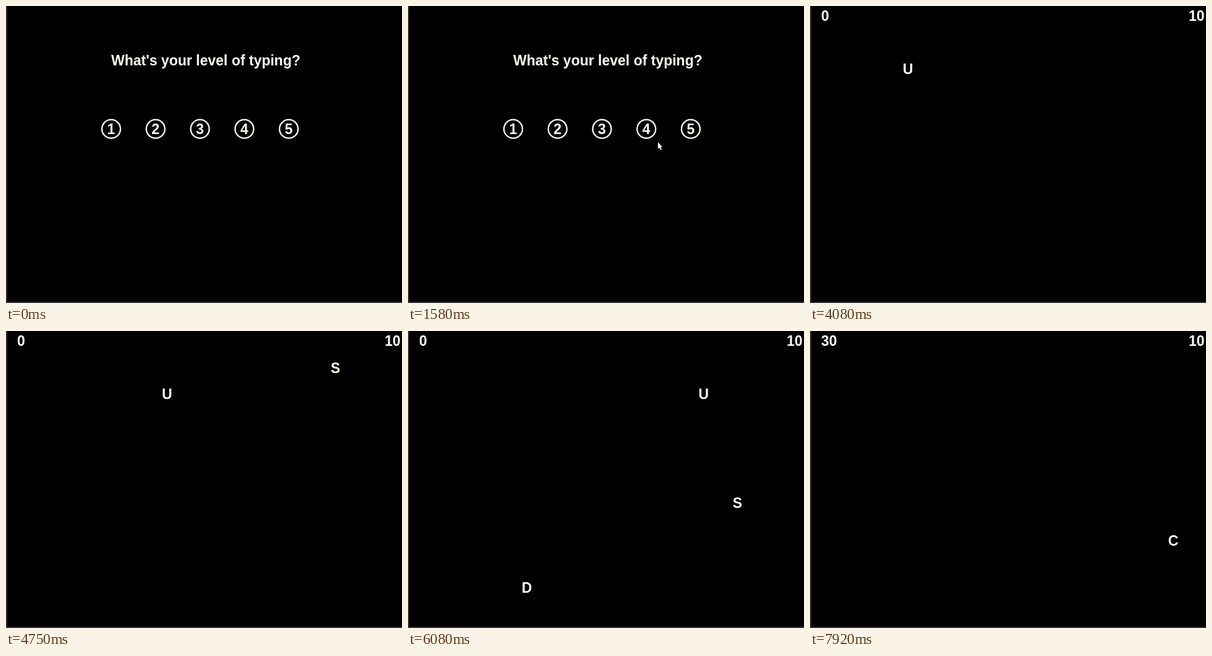
Animation of 640x480 px, one loop 8 s. Source, as an HTML page with a canvas:

```html
<!DOCTYPE html>
<html lang="en">
<head>
<meta charset="utf-8">
<title>Typing game</title>
<style>
  html, body { margin: 0; width: 100%; height: 100%; overflow: hidden; background: #000; }
  canvas { display: block; width: 640px; height: 480px; }
</style>
</head>
<body>
<canvas id="stage" width="640" height="480"></canvas>
<script>
const ctx = document.getElementById('stage').getContext('2d');
const LOOP = 8000, FPS = 12, STEP = 6.8;
const INK = '#fffff0', EDGE = '#32322e';
const GAME_START = 26;

// Game ticks elapsed at each step of the clock: [step, ticks]
const TICKS = [[38, 0], [47, 17], [49, 21], [57, 36], [64, 51], [67, 56], [73, 68], [77, 71.4], [80, 77]];
// Pointer: [step, x, y]
const POINTER = [[11, 606, 480], [15, 476, 300], [19, 404, 220], [24, 389, 205]];

function along(keys, at, column = 1) {
  if (at <= keys[0][0]) return keys[0][column];
  for (let i = 1; i < keys.length; i++) {
    const a = keys[i - 1], b = keys[i];
    if (at <= b[0]) return a[column] + (b[column] - a[column]) * (at - a[0]) / (b[0] - a[0]);
  }
  return keys[keys.length - 1][column];
}

function write(text, x, y, align = 'center') {
  ctx.font = 'bold 23px "Liberation Sans", Arial, sans-serif';
  ctx.textAlign = align;
  ctx.fillText(text, x, y);
}

function drawEdges() {
  ctx.fillStyle = EDGE;
  ctx.fillRect(0, 0, 2, 480);
  ctx.fillRect(0, 478, 640, 2);
}

function drawPointer(x, y) {
  const outline = [[0, 0], [0, 11], [2.5, 9], [4.5, 13], [6, 12], [4.5, 8], [7, 8]];
  ctx.beginPath();
  for (const [dx, dy] of outline) ctx.lineTo(x + dx, y + dy);
  ctx.fill();
}

function drawMenu(step) {
  write("What's your level of typing?", 170, 96, 'left');
  ctx.lineWidth = 2.3;
  for (let level = 1; level <= 5; level++) {
    const x = 170 + (level - 1) * 71.75;
    ctx.beginPath();
    ctx.arc(x, 198.7, 15, 0, Math.PI * 2);
    ctx.stroke();
    write(level, x, 207);
  }
  if (step >= POINTER[0][0]) drawPointer(along(POINTER, step, 1), along(POINTER, step, 2));
}

function drawGame(step) {
  const hits = [75, 77, 80];
  const score = hits.filter(hit => step >= hit).length * 10;
  write(score, 18, 24, 'left');
  write('10', 612, 24, 'left');

  const tick = Math.round(along(TICKS, step));
  if (step >= 38 && step < hits[0]) write('U', 15.5 + tick * STEP, 110);
  if (tick >= 29 && step < hits[1]) write('S', 532.5, 170 + (tick - 51) * STEP);
  if (tick >= 63 && step < hits[2]) write('D', 192, 422.5 - (tick - 68) * STEP);
  if (step >= 94) write('C', 596 - (step - 94) * 9, 347);
}

function render(now) {
  const step = Math.floor(((now % LOOP) + 4) * FPS / 1000) % (LOOP * FPS / 1000);
  ctx.fillStyle = '#000';
  ctx.fillRect(0, 0, 640, 480);
  drawEdges();
  ctx.fillStyle = ctx.strokeStyle = INK;
  if (step < GAME_START) drawMenu(step);
  else drawGame(step);
}

const start = performance.now();
function loop() {
  render(performance.now() - start);
  requestAnimationFrame(loop);
}
loop();
</script>
</body>
</html>
```
